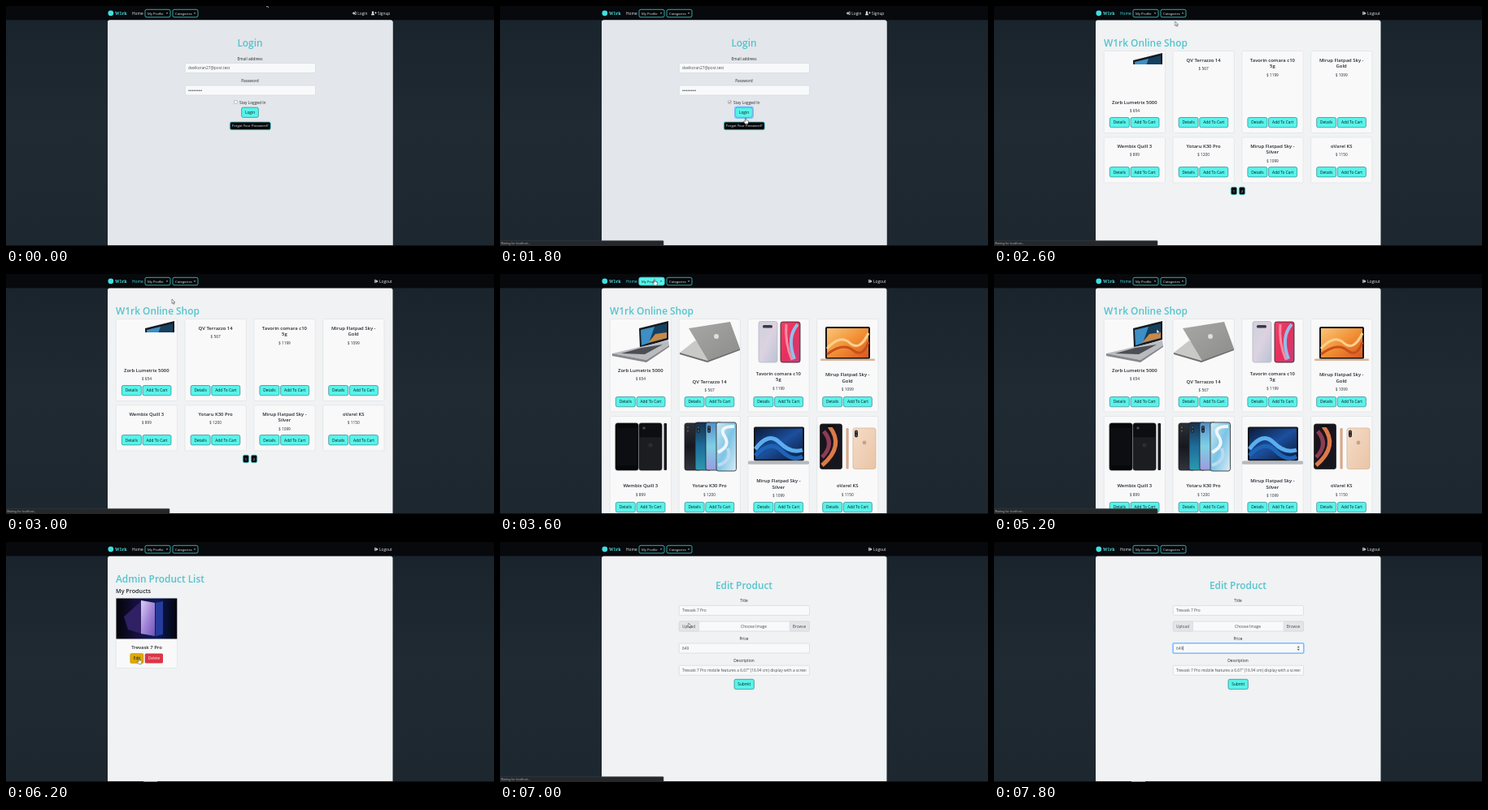
Recreate the animation shown at these times as an HTML page. Size 600x296 px, loop 8000 ms.

```html
<!DOCTYPE html>
<html lang="en">
<head>
<meta charset="utf-8">
<title>Online shop walkthrough</title>
<style>
html, body { margin: 0; width: 100%; height: 100%; overflow: hidden; background: #1e2830; }
svg { display: block; width: 100vw; height: 100vh; }
text { font: 4.8px "Open Sans", "Noto Sans", sans-serif; fill: #24292e; white-space: pre; }
.mid { text-anchor: middle; }
.h1 { font-size: 11.9px; font-weight: 600; fill: #55c3cd; }
.h2 { font-size: 7.2px; font-weight: 600; }
.h5 { font-size: 5.9px; font-weight: 600; }
.small { font-size: 4.2px; }
.tiny { font-size: 3.5px; fill: #b4b8bc; }
.light { fill: #e8eaec; }
.dark { fill: #08191b; }
.field { fill: #495057; }
.brand { font: bold 5.2px "Noto Serif", "Liberation Serif", serif; fill: #4fdfe0; }
.on { visibility: hidden; animation: 8s step-end infinite; }
#home { fill: #e8eaec; animation: home 8s step-end infinite; }
@keyframes home { 32.5% { fill: #45dce0; } 70% { fill: #e8eaec; } }
#cursor { animation: cursor 8s infinite; }
@keyframes cursor {
  0%, 5% { transform: translate(320px, -4px); animation-timing-function: steps(3); }
  12.5%, 17.5% { transform: translate(282px, 118px); animation-timing-function: steps(1); }
  20%, 27.5% { transform: translate(302px, 138px); animation-timing-function: steps(1); }
  30% { transform: translate(232px, 13px); animation-timing-function: steps(3); }
  37.5% { transform: translate(204px, 31px); animation-timing-function: steps(3); }
  45%, 47.5% { transform: translate(190px, 6.5px); animation-timing-function: steps(4); }
  57.5%, 62.5% { transform: translate(190px, 62px); animation-timing-function: steps(1); }
  65% { transform: translate(200px, 68px); animation-timing-function: steps(4); }
  75%, 82.5% { transform: translate(163.5px, 143px); animation-timing-function: steps(4); }
  92.5%, 100% { transform: translate(300px, 57px); animation-timing-function: steps(1); }
}
</style>
</head>
<body>
<svg id="stage" viewBox="0 0 600 296" preserveAspectRatio="none"></svg>
<script>
const LOOP = 8000;
let rules = '', count = 0;

// Shows content only between two times of the loop.
function on(from, to, content) {
  const name = 'on' + count++;
  const end = to < LOOP ? `${to / LOOP * 100}% { visibility: hidden }` : '';
  rules += `@keyframes ${name} { ${from / LOOP * 100}% { visibility: visible } ${end} }\n`;
  return `<g class="on" style="animation-name:${name}">${content}</g>`;
}
const text = (x, y, s, cls = '') => `<text x="${x}" y="${y}" class="${cls}">${s}</text>`;
const mid = (x, y, s, cls = '') => text(x, y, s, 'mid ' + cls);
const rect = (x, y, w, h, fill, r = 0, stroke = 'none', sw = .6) =>
  `<rect x="${x}" y="${y}" width="${w}" height="${h}" rx="${r}" fill="${fill}" stroke="${stroke}" stroke-width="${sw}"/>`;
const poly = (points, fill) => `<polygon points="${points}" fill="${fill}"/>`;
const path = (d, stroke, w = .8, fill = 'none') =>
  `<path d="${d}" fill="${fill}" stroke="${stroke}" stroke-width="${w}"/>`;
const dot = (x, y, r, fill) => `<circle cx="${x}" cy="${y}" r="${r}" fill="${fill}"/>`;
const grad = (id, colors, x2 = 1, y2 = 1) => `<linearGradient id="${id}" x2="${x2}" y2="${y2}">` +
  colors.map((c, i) => `<stop offset="${i / (colors.length - 1)}" stop-color="${c}"/>`).join('') + '</linearGradient>';

const button = (x, y, w, label) =>
  rect(x, y, w, 12.3, '#58f3ea', 2, '#1f6f78') + mid(x + w / 2, y + 7.9, label, 'dark');
const blackButton = (x, y, w, h, label) =>
  rect(x, y, w, h, '#050709', 2, '#45cfd4', .8) + mid(x + w / 2, y + h / 2 + 1.6, label, 'small light');
const input = (y, value = '', cls = 'field') =>
  rect(220.3, y, 160.2, 12, '#f8f9fa', 1.3, '#ced4da') + text(224, y + 7.8, value, cls);
const ring = (x, y, w, h, r) => rect(x, y, w, h, 'none', r, '#80bdff', 1.6);
const panel = fill => rect(125, 17.5, 350.5, 290, fill, 2.5);
const card = (x, y, h) => rect(x, y, 75.2, h, '#f9f9fa', 1.2, '#dcdfe1');

const defs = `<defs>
  ${grad('side', ['#19232b', '#1f2a33', '#1d272f'], 0)}
  ${grad('pearl', ['#cfd0dc', '#dcd2e0', '#b9c2d4'])}
  ${grad('neon', ['#f04068', '#e8305c', '#c83c7c'])}
  ${grad('sand', ['#fbc676', '#f29136', '#d8581e'])}
  ${grad('deep', ['#0c1c3c', '#1c4f9c', '#0a1a3a'])}
  ${grad('ice', ['#cfeaf4', '#7cc4e6', '#dcecf6'])}
  ${grad('sky', ['#4f8fd0', '#7fd0e4', '#9a9ce0'], 0)}
  ${grad('teal', ['#14304c', '#1f6c9a', '#2b9ab0'], 0)}
  ${grad('slate', ['#2c3038', '#16181e', '#30343e'], 0)}
  ${grad('gold', ['#f5dcc8', '#e9c4a6'])}
  ${grad('steel', ['#a8a8a6', '#8c8c8a'])}
  ${grad('night', ['#030308', '#16103c', '#0c1a58', '#03040c'], 1, 0)}
  ${grad('slab', ['#ddd2f6', '#a386d8', '#6b54b6'])}
  <clipPath id="partial"><rect x="135" y="56" width="76" height="16"/></clipPath>
  <clipPath id="field"><rect x="222" y="152" width="154.5" height="13"/></clipPath>
</defs>`;

const phone = (x, y, w, h, fill, edge = '#222') => rect(x, y, w, h, fill, 2.5, edge, .8);
const lens = (x, y) => rect(x, y, 4, 9, '#26262c', 2) + dot(x + 2, y + 2.3, 1, '#566') + dot(x + 2, y + 6.5, 1, '#566');
const openLid = poly('171,67 207,58 207,81 172,91', '#15191f') + poly('173,69 205,61 205,79 174,88', '#16405f') +
  poly('173,69 190,65 183,85 174,88', '#3d8fc4') + poly('182,85 191,74 205,72 205,79', '#c58a4c');
const photos = [
  openLid + poly('138,98 172,90 207,82 208,88 180,106', '#b9bbbe') + poly('149,98 174,91 200,87 178,99', '#4b4e54') +
    poly('138,98 180,106 208,88 208,90 180,109 138,101', '#85888d'),
  poly('221,97 240,82 264,103 255,108', '#c9c9c8') + poly('232,67 283,59 295,92 256,107', 'url(#steel)') +
    poly('221,97 255,107 295,92 295,94 255,109 221,99', '#6e6e6d') + dot(266, 77, 3, '#dededc'),
  phone(318, 58.5, 23, 50.5, 'url(#pearl)', '#b6bac4') + rect(323, 63, 12, 3.4, '#3a3a44', 1.5) +
    phone(345, 59, 24, 50, 'url(#neon)') + path('M366 62Q352 78 362 105', '#8fc0ea', 4) + path('M352 62Q350 85 359 106', '#f58ca4', 3),
  rect(400, 65, 55, 40, '#171316', 2) + rect(402, 67, 51, 36, 'url(#sand)') +
    path('M402 92Q418 74 430 85T453 73', '#fbd08c', 3) + path('M402 99Q422 84 434 94T453 84', '#c9501c', 3) +
    rect(394, 104.5, 67, 2.6, '#d8b498', 1.2),
  phone(142, 184, 28, 58, '#07080a') + rect(144, 190, 24, 46, '#0d0e11') +
    phone(171, 184, 28, 58, '#1c1d21') + rect(171.5, 184.5, 27, 17, '#0d0e11', 2) + dot(177, 190, 1.8, '#42464c') +
    dot(185, 211, 2.6, '#2c2d31') + rect(201.5, 184, 3.6, 58, '#1a1b1f', 1.2),
  phone(227, 184, 20, 58, 'url(#slate)') + lens(229, 187) + phone(240, 183, 20, 59, 'url(#teal)') + lens(242, 187) +
    phone(253, 183, 20, 59, 'url(#sky)') + lens(255, 187) + phone(266, 183, 24.5, 60, 'url(#ice)') +
    path('M268 220Q284 212 276 200T288 188', '#f0f6fa', 4) + path('M268 236Q286 230 280 215', '#b8dcee', 4),
  rect(312, 188.5, 62, 42, '#15171c', 2) + rect(314, 190.5, 58, 38, 'url(#deep)') +
    path('M314 216Q330 194 344 208T372 217', '#5aaef0', 5) + path('M314 224Q332 204 346 218T372 225', '#1d64b8', 5) +
    rect(305, 230.5, 75, 4.2, '#b4b9c0', 1.5),
  phone(393.5, 185, 27, 55.5, '#17151c') + path('M396 236Q424 212 405 188', '#dc7a48', 5) +
    path('M396 226Q412 210 398 194', '#8c3c54', 5) + rect(401, 186, 12, 3, '#111', 1) +
    rect(425.5, 190, 3.2, 50.5, '#d8a88a', 1.2) +
    phone(434, 190, 28, 50.5, 'url(#gold)', '#d9b596') + lens(436, 192.5) + dot(448, 208, 2.4, '#c9a284')
];

const products = [
  { lines: ['Zorb Lumetrix 5000'], price: 654, title: 120.5 },
  { lines: ['QV Terrazzo 14'], price: 567, title: 134.5 },
  { lines: ['Tavorin comara c10', '5g'], price: 1199, title: 124.5 },
  { lines: ['Mirup Flatpad Sky -', 'Gold'], price: 1099, title: 126 },
  { lines: ['Wembix Quill 3'], price: 899, title: 263 },
  { lines: ['Yotaru K30 Pro'], price: 1200, title: 263 },
  { lines: ['Mirup Flatpad Sky -', 'Silver'], price: 1099, title: 257 },
  { lines: ['oVarel KS'], price: 1150, title: 263 }
];

function shop(loaded) {
  const tops = loaded ? [55.5, 175.5] : [55.5, 162];
  const heights = loaded ? [114.5, 125] : [101, 56];
  const buttonTops = loaded ? [151.5, 281.5] : [137.5, 198.6];
  const cards = products.map((p, i) => {
    const row = i >> 2, x = 135.3 + (i % 4) * 84.8, c = x + 37.5;
    const y = loaded || i === 0 ? p.title : row ? 174.5 : 68.5;
    return card(x, tops[row], heights[row]) + (loaded ? photos[i] : '') +
      p.lines.map((s, k) => mid(c, y + k * 7.8, s, 'h5')).join('') +
      mid(c, y + p.lines.length * 7.8 + 2.8, '$ ' + p.price) +
      button(x + 7, buttonTops[row], 24, 'Details') + button(x + 32.7, buttonTops[row], 35, 'Add To Cart');
  }).join('');
  const extras = loaded ? '' : `<g clip-path="url(#partial)">${openLid}</g>` +
    blackButton(291.3, 223.3, 7.4, 9.4, '1') + blackButton(301.3, 223.3, 7.4, 9.4, '2');
  return text(135, 50, 'W1rk Online Shop', 'h1') + cards + extras;
}

const login = mid(300, 50.3, 'Login', 'h1') +
  mid(300, 66.5, 'Email address') + input(70.6, 'dvelkoran27@post.test') +
  mid(300, 93.6, 'Password') + input(98) +
  Array.from({ length: 8 }, (_, i) => dot(225 + i * 2.15, 104.3, .75, '#3a4046')).join('') +
  rect(280.5, 116.6, 3.8, 3.8, '#fff', .5, '#888', .5) + text(287, 120.6, 'Stay Logged In') +
  button(289.6, 125.1, 20.8, 'Login') + blackButton(275.3, 143, 50, 9.7, 'Forgot Your Password?');

const admin = text(135, 50, 'Admin Product List', 'h1') + text(135, 63, 'My Products', 'h2') +
  card(135.3, 69.3, 86.2) +
  rect(135.5, 69.5, 74.8, 50, 'url(#night)') + poly('145,92 166,73 169,114 150,108', '#302064') +
  poly('166,72 183,75 183,116 166,113', 'url(#slab)') + poly('184,75 193,73 193,114 184,116', '#263c9c') +
  mid(173, 132.2, 'Trevask 7 Pro', 'h5') +
  rect(152.8, 137.5, 16.2, 12, '#e0a800', 1.6, '#c79500') + mid(161, 145.3, 'Edit', 'dark') +
  rect(170.8, 137.5, 22.2, 12, '#dc3545', 1.6) + mid(182, 145.3, 'Delete', 'light');

const edit = mid(300, 58, 'Edit Product', 'h1') +
  mid(300, 73.6, 'Title') + input(78.4, 'Trevask 7 Pro') +
  input(98) + rect(220.3, 98, 24.3, 12, '#e3e6e9', 1.3, '#ced4da') + mid(232, 105.7, 'Upload', 'field') +
  mid(312, 105.7, 'Choose Image', 'field') + rect(356.2, 98, 24.3, 12, '#e3e6e9', 1.3, '#ced4da') + mid(368, 105.7, 'Browse', 'field') +
  mid(300, 120.6, 'Price') + input(125, '649') +
  mid(300, 147.6, 'Description') + input(152.3) +
  `<g clip-path="url(#field)">${text(224, 160, 'Trevask 7 Pro mobile features a 6.67" (16.94 cm) display with a screen', 'field')}</g>` +
  button(288, 169.3, 24.4, 'Submit');

const priceFocus = ring(220, 124.7, 160.8, 12.6, 1.6) + path('M232.6 128.3v5.4', '#222', .5) +
  rect(372.5, 127.6, 3.4, 7, '#e4e6e8', .5) +
  poly('373,130.3 374.2,128.6 375.4,130.3', '#444') + poly('373,132 374.2,133.7 375.4,132', '#444');

const caret = (x, fill) => poly(`${x - 1.2},8.4 ${x + 1.2},8.4 ${x},9.8`, fill);
const navButton = (x, label, fill = '#050709', cls = 'light', tip = '#e8eaec') =>
  rect(x, 4.3, 31, 9.5, fill, 2, '#45cfd4', .8) + text(x + 3, 10.7, label, 'small ' + cls) + caret(x + 27, tip);
const entry = (x, bracket) => rect(x + .6, 8.2, 1.6, 1.4, '#e8eaec') +
  poly(`${x + 2},6.9 ${x + 4},8.9 ${x + 2},10.9`, '#e8eaec') + path(bracket, '#e8eaec', .7);
const guest = entry(425.5, 'M428.8 7.2h1.4v3.4h-1.4') + text(432.3, 10.9, 'Login', 'light') +
  dot(451, 7.8, 1.2, '#e8eaec') + path('M449 11.2q0 -2.3 2 -2.3t2 2.3z', 'none', 0, '#e8eaec') +
  path('M453.3 8.4h2.4M454.5 7.2v2.4', '#e8eaec', .7) + text(457, 10.9, 'Signup', 'light');
const member = entry(453.4, 'M454.8 7.2h-1.4v3.4h1.4') + text(459, 10.9, 'Logout', 'light');

const menuItems = ['My Account', 'My Cart', 'My Orders', 'Add Product', 'My Products'];
const menu = rect(171, 15.5, 50, 55, '#fff', 1.3, '#c5c9cc') + rect(171.3, 58.3, 49.4, 9.8, '#eef1f3') +
  menuItems.map((s, i) => text(178, 25.2 + i * 9.9, s)).join('');

const status = rect(-1, 289.4, 202, 8, '#25282b', 1, '#3a3e42', .5) + text(1, 294, 'Waiting for localhost...', 'tiny');

const arrow = path('M0 0v5.4l1.3 -1.1 .9 2 .9 -.4 -.9 -2h1.7z', '#222', .5, '#fff');
const hand = path('M-.6 .3q.6 -.6 1.2 0v2.5l2.4 .6q.7 .3 .5 1.2l-.6 2.9h-3.4l-2 -3q.4 -.9 1.9 .2z', '#222', .5, '#fff');

document.getElementById('stage').innerHTML = defs +
  rect(0, 0, 600, 296, 'url(#side)') + rect(0, 0, 600, 17.3, '#07090c') +
  panel('#f0f2f3') +
  on(0, 2600, panel('#e3e6ea') + login) +
  on(1200, 2600, path('M281.2 118.5l1 1.1 1.6 -2.2', '#333', .7)) +
  on(1600, 2600, ring(288.8, 124.3, 22.4, 13.9, 2.6)) +
  on(2600, 3200, shop(false)) +
  on(3200, 5600, shop(true)) +
  on(5600, 6800, admin) +
  on(6800, LOOP, edit) +
  on(7800, LOOP, priceFocus) +
  rect(0, 295.1, 600, .9, '#0b0e11') + on(5600, LOOP, rect(169, 295.1, 17, .9, '#9a9da0')) +
  dot(128.8, 8.8, 3.4, '#40dfe0') + text(134, 11, 'W1rk', 'brand') +
  '<text id="home" x="155" y="10.9">Home</text>' +
  navButton(171, 'My Profile') + navButton(205, 'Categories') +
  on(3600, 4800, navButton(171, 'My Profile', '#58f3ea', 'dark', '#08191b')) +
  on(0, 2600, guest) + on(2600, LOOP, member) +
  on(3800, 4800, menu) +
  on(1600, 3200, status) + on(4800, 5800, status) + on(6400, 7400, status) +
  '<g id="cursor">' +
  [[0, 1600], [2400, 3600], [3800, 4600], [5200, 6000], [6800, 7800]].map(([a, b]) => on(a, b, arrow)).join('') +
  [[1600, 2400], [3600, 3800], [4600, 5200], [6000, 6800]].map(([a, b]) => on(a, b, hand)).join('') +
  '</g>';

const sheet = document.createElement('style');
sheet.textContent = rules;
document.head.append(sheet);
</script>
</body>
</html>
```
